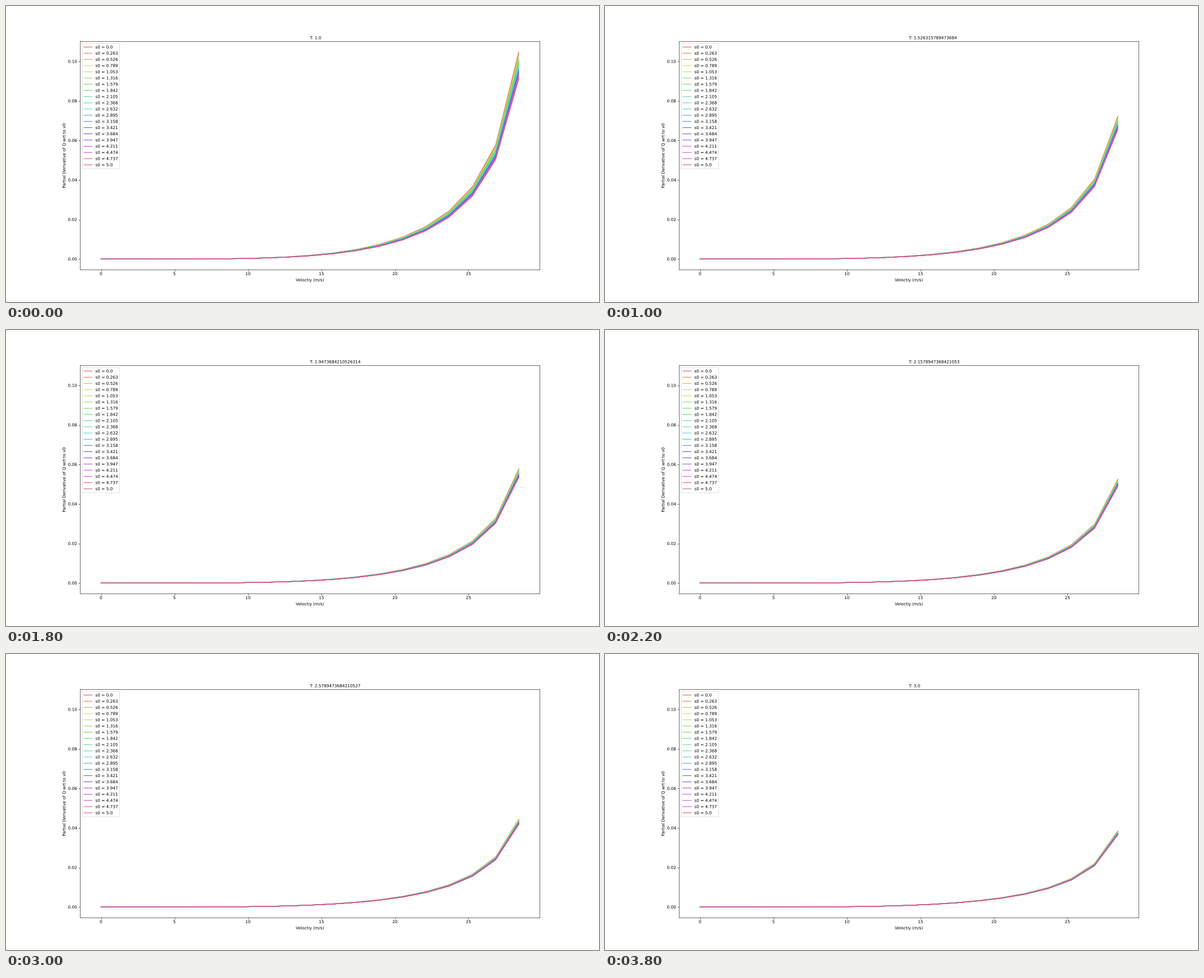
Write a matplotlib script that moves like this. It is 1058 px wide and 529 px high and loops after 4 s.

```python
import colorsys

import matplotlib.pyplot as plt
import numpy as np
from matplotlib.animation import FuncAnimation
from matplotlib.lines import Line2D
from matplotlib.patches import FancyBboxPatch
from matplotlib.patheffects import Normal
from matplotlib.text import Text
from matplotlib.transforms import Affine2D

plt.rcParams.update({"font.family": "DejaVu Sans", "font.size": 10})

N = 20
V0 = 30.0        # desired velocity
CAR = 5.0        # vehicle length
EM = 1000 / 72   # 10 pt on the 2000 x 1000 layout page

speeds = np.linspace(0, V0, N)[:-1]   # the last sample is singular
gaps = np.linspace(0, 5, N)
headways = np.linspace(1, 3, N)
colors = [colorsys.hls_to_rgb(i / N + 0.01, 0.6, 0.65) for i in range(N)]


def dq_dv0(v, s0, T):
    """Sensitivity of equilibrium flow to the desired velocity."""
    u = v / V0
    free = 1 - u ** 4
    want = s0 + v * T
    return 2 * u ** 5 * want * free ** -1.5 / (want / np.sqrt(free) + CAR) ** 2


fig = plt.figure(figsize=(20, 10), dpi=52.9, facecolor="white")
ax = fig.add_axes([0.125, 0.11, 0.775, 0.77])
page = Affine2D().scale(1 / 2000, -1 / 1000).translate(0, 1) + fig.transFigure


def label(x, y, text, **kw):
    return fig.text(x, y, text, transform=page, va="baseline", **kw)


def draw_legend():
    left, top = 250 + 0.5 * EM, 120 + 0.5 * EM
    pad, text_h = 0.4 * EM, 14
    row = text_h + 0.5 * EM
    width = 2 * pad + 2.8 * EM + 76.3
    height = 2 * pad + N * text_h + (N - 1) * 0.5 * EM
    fig.add_artist(FancyBboxPatch(
        (left, top), width, height, transform=page, alpha=0.8, lw=1,
        boxstyle=f"round,pad=0,rounding_size={0.2 * EM}",
        facecolor="white", edgecolor="0.8"))
    x = left + pad
    for i, (s0, color) in enumerate(zip(gaps, colors)):
        base = top + pad + 11 + i * row
        y = base - 0.35 * EM
        fig.add_artist(Line2D([x, x + 2 * EM], [y, y], transform=page,
                              color=color, lw=1.5, snap=False))
        label(x + 2.8 * EM, base, f"s0 = {round(float(s0), 3)}")


peak = dq_dv0(speeds[-1], 0, headways[0])
ax.set_xlim(-0.05 * speeds[-1], 1.05 * speeds[-1])
ax.set_ylim(-0.05 * peak, 1.05 * peak)
ax.set_xticks(range(0, 30, 5))
ax.set_yticks(np.arange(6) * 0.02)
ax.yaxis.set_major_formatter("{x:.2f}")

label(1025, 930.3, "Veloctiy (m/s)", ha="center")
fig.text(200.7, 505, "Partial Derivative of Q wrt to v0", transform=page,
         rotation=90, rotation_mode="anchor", ha="center", va="baseline")
title = ax.text(0.5, 1.01, "", transform=ax.transAxes)
curves = [ax.plot([], [], color=c, lw=1.5)[0] for c in colors]
draw_legend()

# Outlined glyphs keep their fractional pixel positions.
for item in fig.findobj(Text):
    item.set_path_effects([Normal()])


def update(i):
    T = float(headways[i])
    title.set_text(f"T: {T}")
    for curve, s0 in zip(curves, gaps):
        curve.set_data(speeds, dq_dv0(speeds, s0, T))
    return [title, *curves]


anim = FuncAnimation(fig, update, frames=N, interval=200, repeat=True,
                     repeat_delay=0, blit=False)
plt.show()
```
